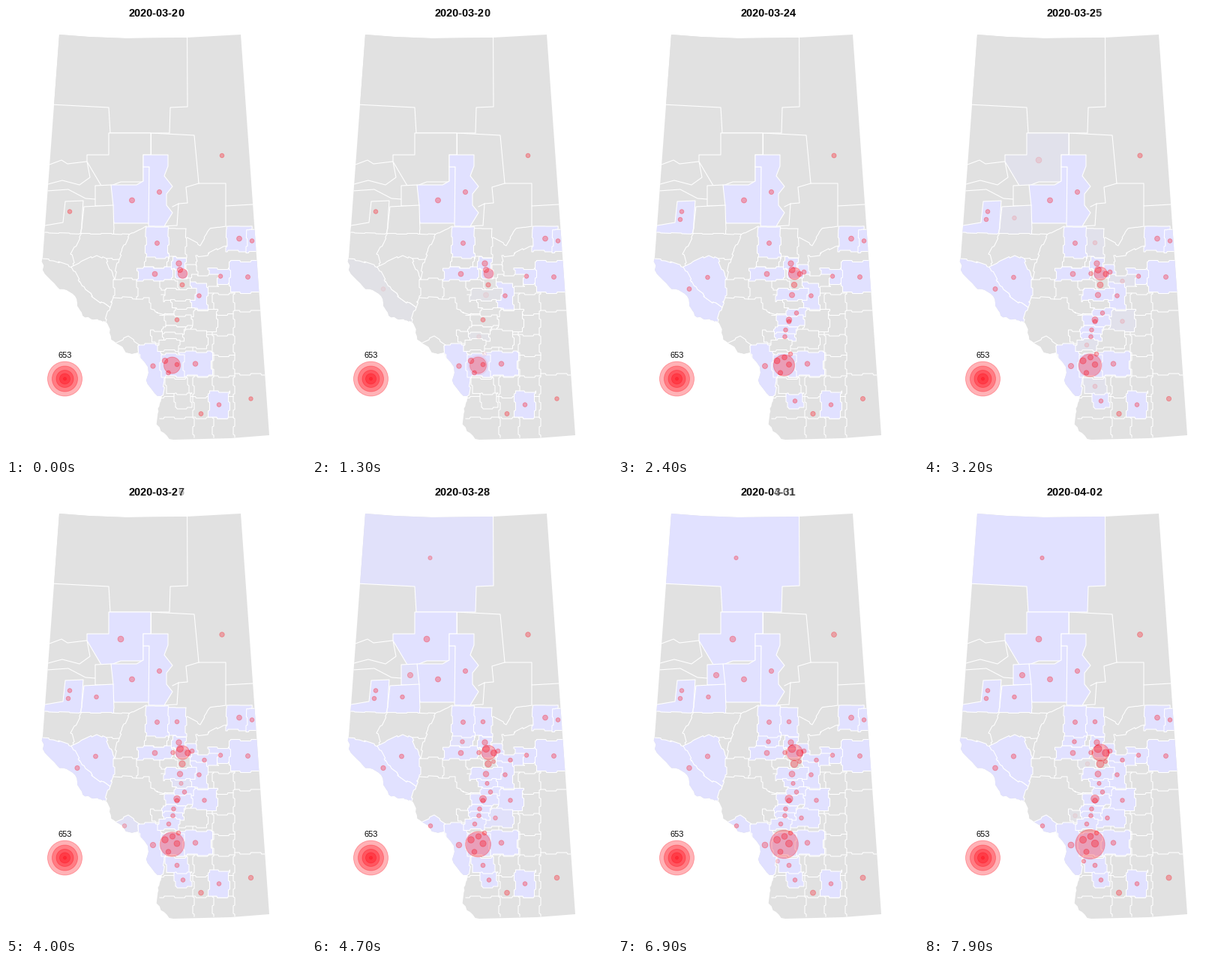
Recreate the animation shown at these times as a matplotlib script. Size 400 by 600 pixels, loop 8000 ms.

```python
import numpy as np
import matplotlib.pyplot as plt
from matplotlib.animation import FuncAnimation
from matplotlib.patches import Circle, Polygon

W, H, DPI = 400, 600, 100
PT = 72 / DPI
FRAMES, STEP_MS = 80, 100
HOLD, FADE = 12, 6  # frames before the first fade, frames per fade

DAYS = [20, *range(23, 32)]
DATES = [f"2020-03-{d}" for d in DAYS] + [f"2020-04-0{d}" for d in range(1, 4)]
LAST = len(DATES) - 1
GREY = np.array([225, 225, 225]) / 255
LILAC = np.array([225, 225, 255]) / 255

plt.rcParams["font.family"] = "Liberation Sans"
fig = plt.figure(figsize=(W / DPI, H / DPI), dpi=DPI, facecolor="white")
ax = fig.add_axes([0, 0, 1, 1])
ax.set_xlim(0, W)
ax.set_ylim(H, 0)
ax.axis("off")
rng = np.random.default_rng(4)

areas, dots = [], []


def pts(*xy):
    return np.array(xy, float).reshape(-1, 2)


def jagged(path, rounds=3):
    """Roughen a path by repeated midpoint displacement."""
    for _ in range(rounds):
        step = np.diff(path, axis=0)
        side = step[:, ::-1] * [1, -1] * rng.uniform(-0.22, 0.22, (len(step), 1))
        out = np.empty((2 * len(path) - 1, 2))
        out[::2], out[1::2] = path, (path[1:] + path[:-1]) / 2 + side
        path = out
    return path


def surveyed(path):
    """Give long southern borders the small jogs of a land survey grid."""
    parts = [np.linspace(a, b, max(2, int(np.hypot(*(b - a)))))
             for a, b in zip(path[:-1], path[1:])]
    x, y = np.vstack(parts).T
    amp = np.clip((y - 290) / 30, 0, 1)
    return np.column_stack([x + amp * np.sign(np.sin(y / 3.5)),
                            y + amp * np.sign(np.sin(x / 4.5))])


# Province: straight borders, with the mountains along the south-west
rockies = jagged(pts(223, 577, 202, 546, 207, 519, 190, 488, 148, 449, 131, 419,
                     113, 416, 95, 395, 68, 373, 49, 334))
outline = np.vstack([pts(71, 38, 110, 41, 160, 43, 241, 42, 313, 38, 351, 571, 300, 575),
                     rockies])
land = ax.add_patch(Polygon(outline, facecolor=GREY, edgecolor="none", zorder=1))


def border(*xy):
    line, = ax.plot(*surveyed(pts(*xy)).T, color="white", lw=1.1 * PT, zorder=1.5)
    line.set_clip_path(land)


def area(start, *xy):
    """A district that turns lilac on date number start."""
    ring = pts(*xy, *xy[:2])
    patch = ax.add_patch(Polygon(surveyed(ring), facecolor=GREY, edgecolor="white",
                                 lw=1.1 * PT, joinstyle="round", zorder=2))
    patch.set_clip_path(land)
    areas.append((patch, start))


def disc(x, y, r):
    red = (1, 0, 0.06, 0.3)
    return ax.add_patch(Circle((x, y), r, facecolor=red, edgecolor=red,
                               lw=0.9 * PT, zorder=4))


def dot(start, x, y, first=2.8, last=None):
    """A case dot; two discs let one date's size fade into the next."""
    dots.append((disc(x, y, first), disc(x, y, first), start, first, last or first))


def county(start, x, y, w, h, first=2.8, last=None):
    """A box-shaped district around its dot."""
    l, r, t, b = x - w / 2, x + w / 2, y - h / 2, y + h / 2
    area(start, l, t, r, t, r, b, l, b)
    dot(start, x, y, first, last)


# Grey districts: northern borders, then the southern survey grid
border(193, 169, 251, 172, 257, 236, 293, 236, 293, 266, 329, 264)
border(193, 169, 193, 198)
border(58, 211, 74, 205, 82, 210, 107, 207)
border(56, 237, 75, 232, 98, 238, 112, 228, 108, 207)
border(54, 246, 83, 244, 106, 256, 119, 257)
border(101, 303, 87, 329, 92, 348)
border(144, 303, 165, 304, 150, 336, 133, 337)
border(165, 304, 187, 293)
border(150, 336, 144, 363, 175, 363, 175, 389, 144, 387)
border(175, 389, 192, 389, 192, 404, 216, 411)
border(222, 267, 230, 263, 228, 292, 211, 293)
border(257, 236, 240, 241, 242, 262, 230, 263)
border(240, 308, 258, 318, 272, 296, 293, 293, 293, 266)
border(255, 345, 252, 333, 268, 331, 293, 318)
for y in np.arange(383, 560, 27.5):
    border(206, y, 304, y)
for y in (406, 490):
    border(304, y, 350, y)
for x in (250, 276, 304):
    border(x, 383, x, 575)

# Large lilac districts
area(6, 40, 30, 241.5, 30, 242, 134, 219, 135, 218, 169, 139, 169, 137, 135, 40, 130)
area(4, 137, 169, 193, 169, 193, 198, 183, 198, 183, 234, 153, 234, 140, 239,
     127, 239, 108, 207, 108, 198, 137, 198)
area(0, 140, 238, 174, 238, 183, 233, 183, 214, 191, 214, 191, 289, 144, 289, 140, 261)
area(0, 183, 198, 216, 198, 216, 213, 211, 226, 222, 240, 214, 250, 214, 265,
     222, 275, 211, 293, 190, 293, 191, 214, 183, 214)
area(6, 119, 239, 140, 238, 143, 266, 119, 266)
area(4, 104, 267, 143, 265, 144, 303, 100, 303)
area(2, 79, 260, 103, 259, 100, 303, 40, 301, 52, 292, 76, 288)
area(1, 0, 334, 62, 338, 92, 348, 105, 378, 138, 402, 131, 425, 0, 500)
area(2, 88, 346, 120, 331, 133, 337, 144, 363, 144, 387, 138, 402, 105, 378)
area(5, 146, 447, 162, 440, 177, 450, 178, 470, 140, 470)
area(0, 177, 450, 206, 450, 212, 497, 207, 525, 170, 525, 178, 469)

# Counties from north to south
county(0, 311, 309.5, 34, 33, 3.4)
county(0, 328, 312.5, 14, 30)
county(4, 228, 315, 24, 38)
county(0, 201.5, 315.5, 30, 43, 3)
county(6, 200.5, 341.5, 30, 13)
county(0, 198.5, 356.5, 46, 17, 3.4)
county(0, 230.5, 342.5, 18, 16, 3.7)
county(0, 286, 359.5, 32, 20)
county(0, 322.5, 360.5, 48, 42, 3)
county(0, 235.5, 356, 22, 12, 6.3, 11.4)
county(2, 248, 354, 14, 18, 3)
county(4, 264.5, 366, 36, 16)
county(12, 218, 371, 24, 12)
county(0, 257.5, 385.5, 22, 35)
county(1, 232, 384.5, 42, 16, 3.3, 4)
county(5, 233.5, 397, 26, 11, 2.6)
county(4, 264.5, 419.5, 34, 30)
county(2, 238, 408.5, 26, 12)
county(0, 228, 417.5, 0, 0, 2.8, 5.4)
county(6, 244.5, 443, 48, 24)
area(2, 212, 412, 248, 412, 248, 426, 212, 426)
county(2, 223.5, 431, 30, 10)
county(1, 222.5, 440, 28, 10)
county(12, 201.5, 440, 16, 16)
county(4, 217, 451, 28, 15)
county(0, 252.5, 476, 44, 32, 3.3)
county(0, 221.5, 478, 31, 30, 11, 20)
county(4, 228, 506, 30, 21, 2.9)
county(2, 236, 525.5, 22, 19)
county(0, 284, 530.5, 27, 35)

# Dots of cities and of the large districts
dot(0, 288, 199, 2.8, 3.5)
dot(0, 85, 273.5)
dot(0, 168, 258.5, 3.5)
dot(0, 204.5, 247.5, 3.1)
dot(0, 232, 351, 3.6, 5)
dot(0, 235, 371, 3, 5)
dot(0, 196, 479, 3.2, 4)
dot(0, 212, 472, 3.7, 4.6)
dot(0, 228, 477, 2.8, 4.8)
dot(0, 216.5, 488, 2.9, 3.6)
dot(0, 260, 542.5, 2.9, 3.6)
dot(0, 326.5, 522.5, 2.7, 3.6)
dot(1, 95, 376.5, 2.7, 3.4)
dot(1, 230, 463)
dot(2, 83, 284)
dot(2, 119.5, 361, 2.6, 3.2)
dot(2, 242.5, 356.5, 2.6, 4.8)
dot(2, 228, 420, 2.6, 3.4)
dot(2, 222, 467.5, 3, 4)
dot(3, 222.5, 356)
dot(4, 153, 205, 3.9)
dot(4, 120.5, 282)
dot(5, 158, 453.5)
dot(6, 157.5, 97, 2.6)
dot(6, 131, 253, 3.6)
dot(6, 242, 368, 2.5)
dot(10, 213, 500.5, 2.6)

# Legend
for r in (23, 17, 11.5, 7, 2):
    disc(78.5, 496, r)
ax.text(78.5, 468, "653", ha="center", va="baseline", fontsize=11 * PT)

# Title: the fixed start on the left, the changing digits on the right
style = dict(va="baseline", fontsize=14.4 * PT, fontweight="bold")
shared = ax.text(163, 14, "", ha="left", **style)
old, new = (ax.text(237, 14, "", ha="right", **style) for _ in range(2))


def fade(patch, w):
    patch.set_visible(w > 0)
    patch.set_alpha(0.3 * w)


def draw(frame):
    pos = max(0, (frame - HOLD) / FADE)
    k = int(pos)
    t = pos - k
    for patch, start in areas:
        w = np.clip(pos - start + 1, 0, 1)
        patch.set_facecolor(GREY + (LILAC - GREY) * w)
    for now, then, start, first, last in dots:
        for patch, date, w in ((now, k, 1 - t), (then, k + 1, t)):
            patch.set_radius(first + (last - first) * (date / LAST) ** 0.6)
            fade(patch, w if date >= start else 0)

    a, b = DATES[k], DATES[k + 1]
    same = next(i for i in range(len(a)) if a[i] != b[i])
    ease = t * t * (3 - 2 * t)
    shared.set_text(a[:same])
    for text, date, w in ((old, a, 1 - ease), (new, b, ease)):
        text.set_text(date[same:])
        text.set_alpha(w)
    return []


anim = FuncAnimation(fig, draw, frames=FRAMES, interval=STEP_MS,
                     repeat=True, repeat_delay=0, blit=False)
plt.show()
```
